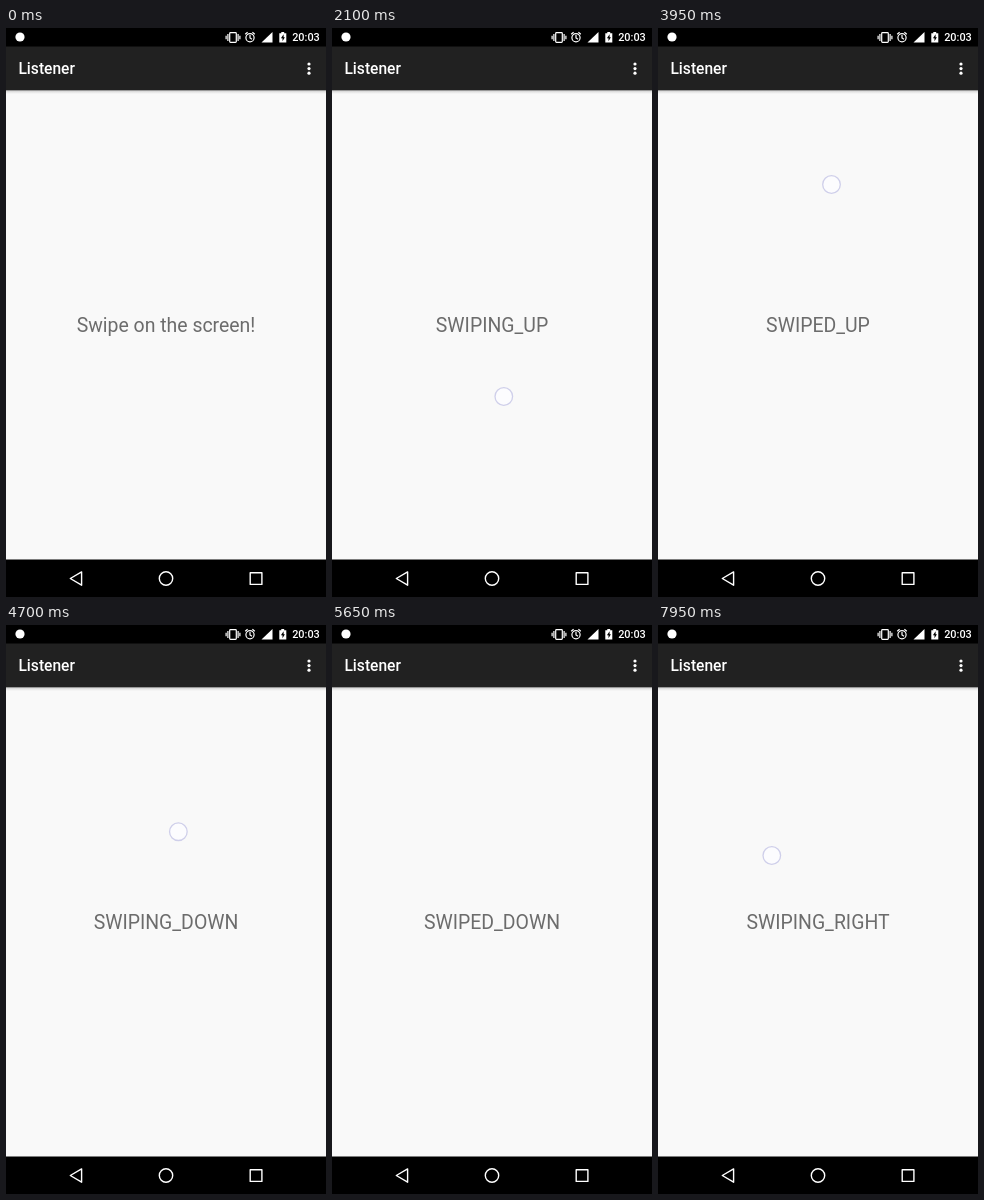
Recreate the animation shown at these times as an HTML page. Size 320 by 569 pixels, loop 8000 ms.

```html
<!DOCTYPE html>
<html lang="en">
<head>
<meta charset="utf-8">
<title>Listener</title>
<style>
  html, body { margin: 0; width: 100%; height: 100%; overflow: hidden; background: #f9f9f9; }
  svg { display: block; width: 320px; height: 569px; }
  text { font-family: Roboto, sans-serif; }
</style>
</head>
<body>
<svg viewBox="0 0 320 569">
  <defs>
    <linearGradient id="shade" x2="0" y2="1">
      <stop stop-color="#000" stop-opacity=".34"/>
      <stop offset=".4" stop-color="#000" stop-opacity=".1"/>
      <stop offset="1" stop-color="#000" stop-opacity="0"/>
    </linearGradient>
  </defs>
  <rect width="320" height="569" fill="#f9f9f9"/>
  <rect y="62" width="320" height="4" fill="url(#shade)"/>
  <rect y="18" width="320" height="44.2" fill="#212121"/>
  <path d="M0 0H320V18.5H0ZM0 531.6H320V569H0Z"/>

  <!-- status bar -->
  <g fill="#fff">
    <circle cx="14" cy="9" r="4.6"/>
    <path d="M255.5 14.5L266.5 4V14.5Z"/>
    <path d="M273.3 5.2H275.3V4H278.2V5.2H280.3V14.5H273.3Z"/>
    <path d="M277.6 6.3L274.9 10.2H276.5V13.2L278.9 9.2H277.6Z" fill="#000"/>
    <text x="313.8" y="13.3" font-size="10.9" font-weight="500" text-anchor="end">20:03</text>
  </g>
  <g fill="none" stroke="#fff" stroke-width="1.2">
    <rect x="223.7" y="4.7" width="6.6" height="9.6" rx=".8"/>
    <path d="M221.9 6V13M232.1 6V13M220.1 7.7V11.3M233.9 7.7V11.3"/>
    <circle cx="244" cy="9.7" r="4.1"/>
    <path d="M244 7V10L246 11.2M239.2 6.3L241.6 4.3M248.8 6.3L246.4 4.3"/>
  </g>

  <!-- toolbar -->
  <g fill="#fff">
    <text x="12.45" y="46.2" font-size="15.57" font-weight="500">Listener</text>
    <circle cx="303" cy="36" r="1.6"/>
    <circle cx="303" cy="40.6" r="1.6"/>
    <circle cx="303" cy="45.2" r="1.6"/>
  </g>

  <!-- navigation bar -->
  <g fill="none" stroke="#fff" stroke-width="1.4" stroke-linejoin="round">
    <path d="M75.6 543.9V557.2L64.3 550.5Z"/>
    <circle cx="160" cy="550.5" r="6.7"/>
    <rect x="244.2" y="544.7" width="11.7" height="11.7"/>
  </g>

  <text id="label" x="160" y="304.4" font-size="19.46" fill="#6c6c6c" text-anchor="middle"></text>
  <circle id="touch" r="8.8" fill="#fcfcfe" stroke="#cfcfea" stroke-width="1.3"/>
</svg>
<script>
const LOOP = 8000, STEP = 50;
const label = document.getElementById('label');
const touch = document.getElementById('touch');

const labels = [
  [0, 'Swipe on the screen!'],
  [1700, 'SWIPING_UP'],
  [3050, 'SWIPED_UP'],
  [4350, 'SWIPING_DOWN'],
  [5650, 'SWIPED_DOWN'],
  [7600, 'SWIPING_RIGHT']
];

// Path points are [time, x, y]; the finger rests before the first one.
const swipes = [
  { from: 1350, to: 3050, path: [[1650, 167.5, 423.5], [2100, 171.8, 368.5], [2600, 178, 215.5], [3000, 179, 166.5]] },
  { from: 3950, to: 5650, path: [[4300, 173.5, 156.5], [5150, 170, 324.5], [5250, 169.5, 357.7], [5600, 168, 454.5]] },
  { from: 7250, to: LOOP, path: [[7550, 70.3, 231.4], [7950, 113.8, 230.5], [8200, 160, 230]] }
];

// Slope at point i: mean of the neighbouring slopes, zero at both ends.
function slope(path, i, axis) {
  if (i === 0 || i === path.length - 1) return 0;
  const rate = k => (path[k + 1][axis] - path[k][axis]) / (path[k + 1][0] - path[k][0]);
  return (rate(i - 1) + rate(i)) / 2;
}

function position(path, t, axis) {
  const last = path.length - 1;
  if (t <= path[0][0]) return path[0][axis];
  if (t >= path[last][0]) return path[last][axis];
  const i = path.findIndex(p => p[0] > t) - 1;
  const a = path[i], b = path[i + 1], span = b[0] - a[0];
  const u = (t - a[0]) / span, v = 1 - u;
  return v * v * (1 + 2 * u) * a[axis] + u * u * (3 - 2 * u) * b[axis]
    + span * u * v * (v * slope(path, i, axis) - u * slope(path, i + 1, axis));
}

function draw(now) {
  const t = Math.floor(now % LOOP / STEP) * STEP;
  label.textContent = labels.findLast(l => l[0] <= t)[1];
  const swipe = swipes.find(s => t >= s.from && t < s.to);
  touch.style.display = swipe ? '' : 'none';
  if (swipe) {
    touch.setAttribute('cx', position(swipe.path, t, 1));
    touch.setAttribute('cy', position(swipe.path, t, 2));
  }
}

const start = performance.now();
function tick() {
  draw(performance.now() - start);
  requestAnimationFrame(tick);
}
tick();
</script>
</body>
</html>
```
